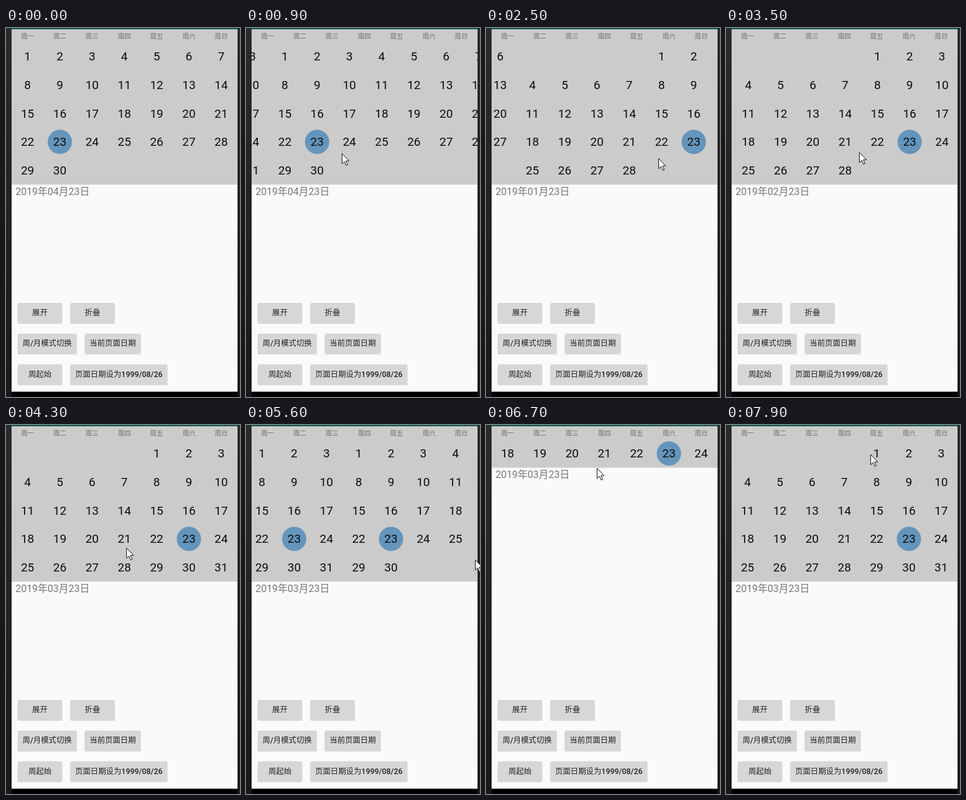
These frames come from a looping animation (376x592 px, 8 s). An HTML page:

```html
<!DOCTYPE html>
<html lang="zh-CN">
<head>
<meta charset="utf-8">
<title>日历</title>
<style>
  html, body { margin: 0; width: 100%; height: 100%; overflow: hidden; background: #222; }
  svg { display: block; width: 376px; height: 592px; }
  text { font-family: Roboto, "Noto Sans CJK SC", "Noto Sans CJK", sans-serif; }
  .mid { text-anchor: middle; }
  .day { font-size: 19px; fill: #0c0c0c; }
  .week { font-size: 10.5px; fill: #6a6a6a; }
  .date { font-size: 15.88px; fill: #777; }
  .btn { font-size: 12.4px; font-weight: 500; fill: #222; }
</style>
</head>
<body>
<svg viewBox="0 0 376 592">
  <defs>
    <linearGradient id="edge" x2="0" y2="1">
      <stop offset="0" stop-color="#2b2b2b"/>
      <stop offset="1" stop-color="#191919"/>
    </linearGradient>
    <clipPath id="screen"><path d="M9 0H372V592H9Z"/></clipPath>
    <clipPath id="below"><path d="M9 23H372V252H9Z"/></clipPath>
  </defs>
  <rect width="376" height="592" fill="url(#edge)"/>
  <g clip-path="url(#screen)">
    <rect x="9" width="363" height="592" fill="#cbcbcb"/>
    <rect x="9" width="363" height="2" fill="#07584d"/>
    <g id="header"></g>
    <g clip-path="url(#below)"><g id="pager"></g></g>
    <g id="panel">
      <rect x="9" y="251.3" width="363" height="520" fill="#fafafa"/>
      <text id="date" class="date" x="15.3" y="268.2"></text>
    </g>
    <g id="buttons"></g>
    <rect x="9" y="583.5" width="363" height="9" fill="#000"/>
  </g>
  <path id="cursor" d="M.5 .5V16.8L4.3 13.2 7 19.4 9.4 18.3 6.8 12.2H11.8Z"
        fill="#fff" stroke="#111" stroke-linejoin="round"/>
</svg>
<script>
const LOOP = 8000, FRAME = 100, SETTLE = 450;
const LEFT = 9, WIDTH = 363, COL = WIDTH / 7, ROW = 45.7, FIRST_PAGE = 3;
const $ = id => document.getElementById(id);

function add(parent, tag, attrs, text) {
  const node = document.createElementNS('http://www.w3.org/2000/svg', tag);
  for (const key in attrs) node.setAttribute(key, attrs[key]);
  if (text !== undefined) node.textContent = text;
  return parent.appendChild(node);
}

const colX = col => LEFT + COL * (col + .5) - .3;

[...'一二三四五六日'].forEach((name, i) =>
  add($('header'), 'text', { class: 'week mid', x: colX(i), y: 17 }, '周' + name));

function buildMonth(month) {
  const page = add($('pager'), 'g', {});
  const first = (new Date(2019, month, 1).getDay() + 6) % 7;
  const days = new Date(2019, month + 1, 0).getDate();
  for (let day = 1; day <= days; day++) {
    const cell = first + day - 1;
    const x = colX(cell % 7), y = ROW * (1 + Math.floor(cell / 7));
    if (day === 23) add(page, 'circle', { cx: x, cy: y, r: 19.5, fill: '#6495bc' });
    add(page, 'text', { class: 'day mid', x, y: y + 6.5 }, day);
  }
  return page;
}
const pages = [0, 1, 2, 3].map(buildMonth);

function addButton(x, y, label) {
  const group = $('buttons');
  const shadow = add(group, 'rect', { x: x - .5, y: y + 1.4, height: 32, rx: 1.5, opacity: .14 });
  const face = add(group, 'rect', { x, y, height: 32, rx: 1.5, fill: '#d6d7d7' });
  const text = add(group, 'text', { class: 'btn mid', y: y + 20.2 }, label);
  const width = Math.max(71, text.getComputedTextLength() + 15);
  shadow.setAttribute('width', width + 1);
  face.setAttribute('width', width);
  text.setAttribute('x', x + width / 2);
  return x + width + 13.5;
}
[['展开', '折叠'], ['周/月模式切换', '当前页面日期'], ['周起始', '页面日期设为1999/08/26']]
  .forEach((labels, row) => labels.reduce((x, label) => addButton(x, 441 + 49.25 * row, label), 19));

const clamp = u => Math.min(1, Math.max(0, u));
const mix = (a, b, u) => a + (b - a) * u;
const settle = u => 1 - (1 - u) ** 5;
const smooth = u => u * u * (3 - 2 * u);
const progress = (t, start, end) => clamp((t - start) / (end - start));

// Swipes turn one page: start, release, dragged distance, pointer at release.
const swipes = [
  [750, 1290, 100, 235, 201],
  [1850, 1950, 90, 325, 201],
  [2400, 2500, 40, 277, 209],
  [3100, 3200, -73, 197, 203],
  [3700, 3800, -73, 150, 197],
  [4450, 4550, -90, 110, 197],
  [5250, 5600, 146.5, 368, 216]
].map(([start, release, drag, x, y]) => ({ start, release, drag, x, y }));

function scrollAt(t) {
  let position = FIRST_PAGE;
  for (const { start, release, drag } of swipes) {
    const dragged = position - drag / WIDTH * progress(t, start, release);
    const target = position - Math.sign(drag);
    position = t < release ? dragged : mix(dragged, target, settle(progress(t, release, release + SETTLE)));
    if (t < release) break;
  }
  return position;
}

const pageAt = t => swipes.reduce((page, s) => t >= s.release ? page - Math.sign(s.drag) : page, FIRST_PAGE);
const foldAt = t => smooth(progress(t, 6200, 6650)) - smooth(progress(t, 6950, 7450));

// The pointer follows every swipe, then drags the calendar up and down.
const pointer = [
  [100, 236, 145], [600, 135, 201],
  ...swipes.flatMap(s => [[s.start, s.x - s.drag, s.y], [s.release, s.x, s.y]]),
  [6200, 190, 205], [6700, 178, 69], [6950, 182, 62], [7350, 216, 185], [7800, 231, 45], [7900, 232, 47]
];

function pointerAt(t) {
  const next = pointer.findIndex(point => point[0] > t);
  if (next < 1) return pointer.at(next).slice(1);
  const [t0, x0, y0] = pointer[next - 1], [t1, x1, y1] = pointer[next];
  const u = smooth(progress(t, t0, t1));
  return [mix(x0, x1, u), mix(y0, y1, u)];
}

function draw(t) {
  const position = scrollAt(t), fold = foldAt(t);
  pages.forEach((page, i) =>
    page.setAttribute('transform', `translate(${(i - position) * WIDTH} ${-3 * ROW * fold})`));
  $('panel').setAttribute('transform', `translate(0 ${-4 * ROW * fold})`);
  $('date').textContent = `2019年0${pageAt(t) + 1}月23日`;
  $('cursor').setAttribute('transform', `translate(${pointerAt(t)})`);
  $('cursor').setAttribute('visibility', t < FRAME ? 'hidden' : 'visible');
}

const began = performance.now();
function tick() {
  const t = (performance.now() - began) % LOOP;
  draw(Math.floor(t / FRAME) * FRAME);
  requestAnimationFrame(tick);
}
tick();
</script>
</body>
</html>
```
